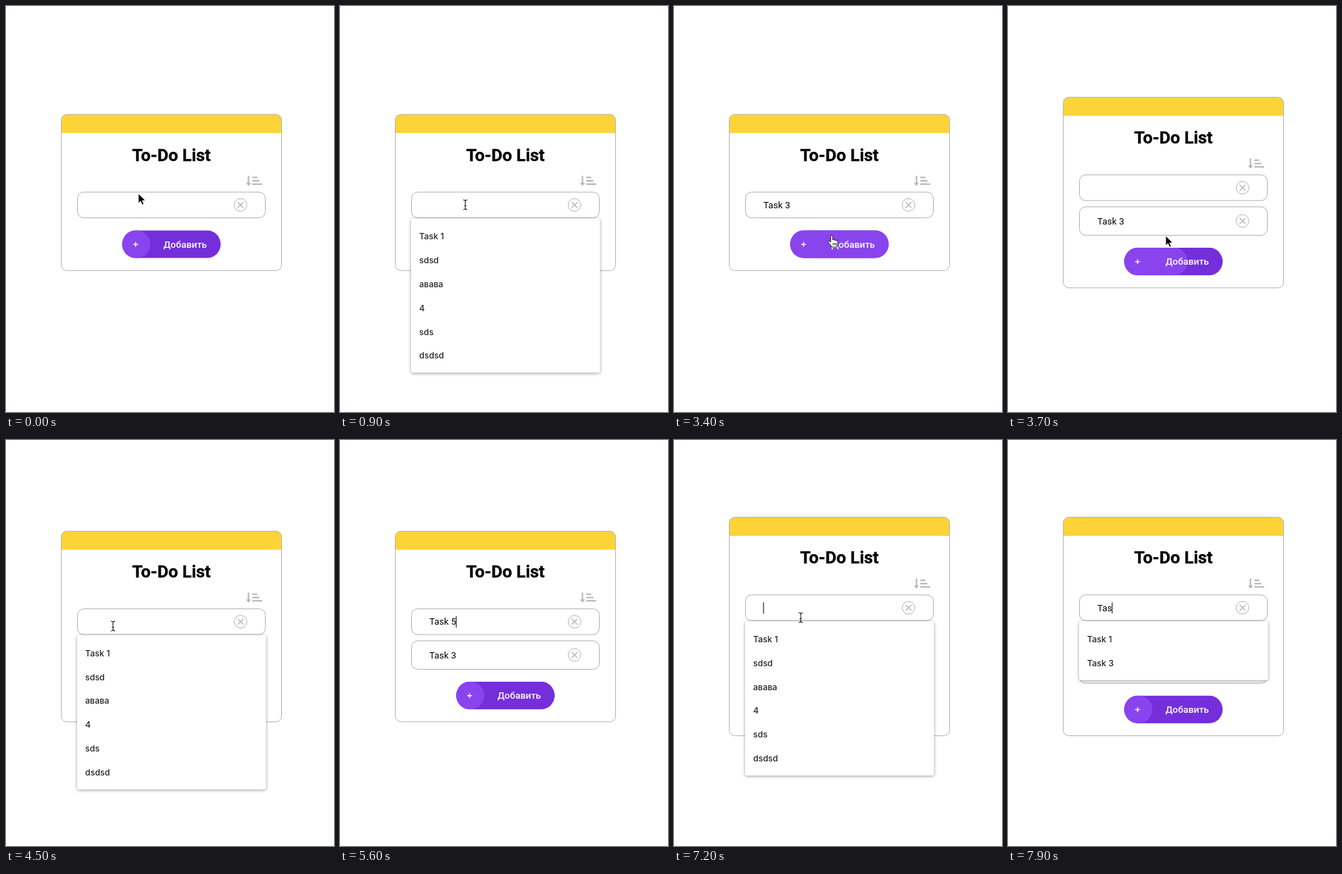
An HTML page for the animation above (8000 ms loop, 466 by 576 pixels).

```html
<!DOCTYPE html>
<html lang="en">
<head>
<meta charset="utf-8">
<title>To-Do List</title>
<style>
  html, body { margin: 0; width: 100%; height: 100%; overflow: hidden; background: #fff; }
  svg { display: block; width: 466px; height: 576px; }
  text { font-family: Roboto, Arial, sans-serif; font-size: 13px; white-space: pre; }
  .title { font-size: 24.3px; font-weight: 700; stroke: #000; stroke-width: .3; }
  .label { font-size: 13.4px; fill: #fff; font-weight: 500; }
  .menu text { font: 500 12px Inter, sans-serif; fill: #222; }
  .box { fill: #fff; stroke: #b2b2b2; }
  .gray { fill: none; stroke: #b4b4b4; }
  .menu rect { filter: drop-shadow(0 1px 2px rgba(0, 0, 0, .4)); }
</style>
</head>
<body>
<svg viewBox="0 0 466 576">
  <defs>
    <clipPath id="pill"><rect x="165" width="140" height="39.3" rx="19.6"/></clipPath>
    <g id="clear" class="gray">
      <circle cx="333.2" r="9"/>
      <path d="M329.2 -4l8 8m0 -8l-8 8" stroke-width="1.3"/>
    </g>
  </defs>
  <g id="card">
    <rect id="panel" x="78.5" y=".5" width="313" rx="8" fill="#fff"/>
    <path d="M78.5 27V8.5a8 8 0 0 1 8-8h297a8 8 0 0 1 8 8V27z" fill="#fdd437"/>
    <rect id="frame" x="78.5" y=".5" width="313" rx="8" class="gray"/>
    <text class="title" x="235" y="66.3" text-anchor="middle">To-Do List</text>
    <path d="M344.5 87.5v11" class="gray" stroke-width="2"/>
    <path d="M341 97.5h7l-3.5 4.5z" fill="#b4b4b4"/>
    <path d="M350 90h7m-7 4.7h10m-10 4.7h14" class="gray" stroke-width="2"/>
    <rect class="box" x="101.5" y="110.7" width="267" height="36.5" rx="9"/>
    <text id="entry" x="127" y="133.6"></text>
    <path id="caret" d="M0 121.2v16" stroke="#000"/>
    <use href="#clear" y="128.9"/>
    <g id="list"></g>
    <g id="button">
      <g clip-path="url(#pill)">
        <rect x="165" width="140" height="39.3" fill="#742fdb"/>
        <rect id="fill" x="165" height="39.3" rx="19.6" fill="#8944ee"/>
      </g>
      <path d="M180.7 19.9h6.8m-3.4 -3.4v6.8" stroke="#fff" stroke-width="1.3"/>
      <text class="label" x="254.6" y="24.5" text-anchor="middle">Добавить</text>
    </g>
    <g id="menu" class="menu"></g>
  </g>
  <g id="pointer">
    <path id="arrow" d="M0 0v14l3.2-3 2.4 5.2 2.4-1-2.3-5.1h4.5z" fill="#000" stroke="#fff" stroke-width=".9"/>
    <path id="beam" d="M-3 -7q3 0 3 2.5q0-2.5 3-2.5M0-4.5v9M-3 7q3 0 3-2.5q0 2.5 3 2.5M-1.5 1.5h3" fill="none" stroke="#222" stroke-width="1.1"/>
    <path id="hand" d="M-1.3 9V.8q0-1.6 1.3-1.6t1.4 1.6v5q2.2-1 2.8.5 2.2-.8 2.6.8 2-.4 2 1.5v3.2L7.2 16H.6L-4.6 9.6q-.8-1.4.3-2 1-.4 3 1.4zM2.2 10v3.5m2.2-3.5v3.5m2.1-3.5v3.5" fill="#fff" stroke="#222" stroke-width="1"/>
  </g>
</svg>
<script>
const LOOP = 8000, STEP = 100, ROW = 33.8;
const $ = id => document.getElementById(id);
const clamp = v => Math.max(0, Math.min(1, v));
const ease = p => p * p * (3 - 2 * p);
const set = (id, attrs) => { for (const k in attrs) $(id).setAttribute(k, attrs[k]); };
const show = (id, on) => $(id).setAttribute('visibility', on ? 'visible' : 'hidden');

const history = ['Task 1', 'sdsd', 'авава', '4', 'sds', 'dsdsd'];
const tasks = ['Task 3', 'Task 5'];
const added = [3600, 6200];
const hovers = [[3200, 3600], [6000, 6200]];
const heights = [222.5, 271.5, 311];

// time, typed text, caret on, number of suggestions
const entries = [
  [0, '', 0, 0], [300, '', 1, 6], [900, '', 0, 6],
  [1400, 'T', 1, 1], [1700, 'Ta', 1, 1], [1900, 'Tas', 1, 1],
  [2000, 'Task', 1, 1], [2100, 'Task ', 1, 1], [2500, 'Task 3', 1, 0],
  [3000, 'Task 3', 0, 0], [3500, 'Task 3', 1, 0], [3600, '', 0, 0],
  [4200, '', 1, 6], [4500, '', 0, 6],
  [4700, 'T', 1, 1], [4800, 'Ta', 1, 1], [4900, 'Tas', 1, 1],
  [5000, 'Task', 1, 1], [5200, 'Task ', 1, 1], [5400, 'Task 5', 1, 0],
  [6000, 'Task 5', 0, 0], [6200, '', 0, 0], [7000, '', 1, 6],
  [7500, 'T', 1, 2], [7700, 'Ta', 1, 2], [7900, 'Tas', 1, 2]
];

// each track is one stretch of visible pointer: time, x, y
const tracks = [
  [[0, 188, 266], [400, 178, 282], [1400, 178, 282]],
  [[3000, 178, 282], [3300, 224, 326], [3800, 224, 326], [4200, 152, 264], [4700, 152, 264]],
  [[5700, 152, 264], [6000, 205, 353], [6200, 205, 353], [6500, 207, 332],
   [6900, 176, 250], [7200, 180, 252], [7500, 180, 252]]
];

function pointerAt(t) {
  const track = tracks.find(k => t >= k[0][0] && t < k[k.length - 1][0]);
  if (!track) return null;
  const i = track.findIndex(k => k[0] > t);
  const [t0, x0, y0] = track[i - 1], [t1, x1, y1] = track[i];
  const p = (t - t0) / (t1 - t0);
  return { x: x0 + (x1 - x0) * p, y: y0 + (y1 - y0) * p };
}

function pointerKind(y, h, count) {
  if (y > 114 && y < 147) return 'beam';
  const inList = count && y > 156 && y < h - 75;
  return inList || y > h - 57.5 ? 'hand' : 'arrow';
}

function drawList(count) {
  let out = count ? `<rect class="box" x="101.5" y="156" width="267" height="${count * 39.5 + 1}" rx="9"/>` : '';
  for (let i = 0; i < count; i++) {
    const y = 176.1 + i * 39.5;
    out += `<text x="127" y="${y + 4.6}">${tasks[i]}</text><use href="#clear" y="${y}"/>`;
  }
  $('list').innerHTML = out;
}

function drawMenu(count) {
  const rows = count === 2 ? ['Task 1', 'Task 3'] : history.slice(0, count);
  $('menu').innerHTML = count
    ? `<rect x="101" y="148" width="268.5" height="${count * ROW + 16}" rx="3" fill="#fff"/>` +
      rows.map((row, i) => `<text x="112.5" y="${178 + i * ROW}">${row}</text>`).join('')
    : '';
}

function render(t) {
  const count = added.filter(a => t >= a).length;
  const h = heights[count], top = 264.6 - h / 2;
  const [, text, caret, menu] = entries.filter(e => e[0] <= t).pop();

  set('card', { transform: `translate(0 ${top})` });
  set('panel', { height: h - 1 });
  set('frame', { height: h - 1 });
  set('button', { transform: `translate(0 ${h - 57.5})` });
  const hover = Math.max(...hovers.map(([a, b]) => clamp((t - a) / 200) - clamp((t - b) / 200)));
  set('fill', { width: 40 + 100 * ease(hover) });

  $('entry').textContent = text;
  const end = text ? $('entry').getComputedTextLength() : 0;
  set('caret', { transform: `translate(${127.2 + end} 0)` });
  show('caret', caret);
  drawList(count);
  drawMenu(menu);

  const pos = pointerAt(t);
  const kind = pos && pointerKind(pos.y - top, h, count);
  for (const id of ['arrow', 'beam', 'hand']) show(id, id === kind);
  if (pos) set('pointer', { transform: `translate(${pos.x} ${pos.y})` });
}

const start = performance.now();
let last = -1;
function tick(now) {
  const t = Math.floor(Math.max(0, now - start) % LOOP / STEP) * STEP;
  if (t !== last) render(last = t);
  requestAnimationFrame(tick);
}
render(0);
requestAnimationFrame(tick);
</script>
</body>
</html>
```
